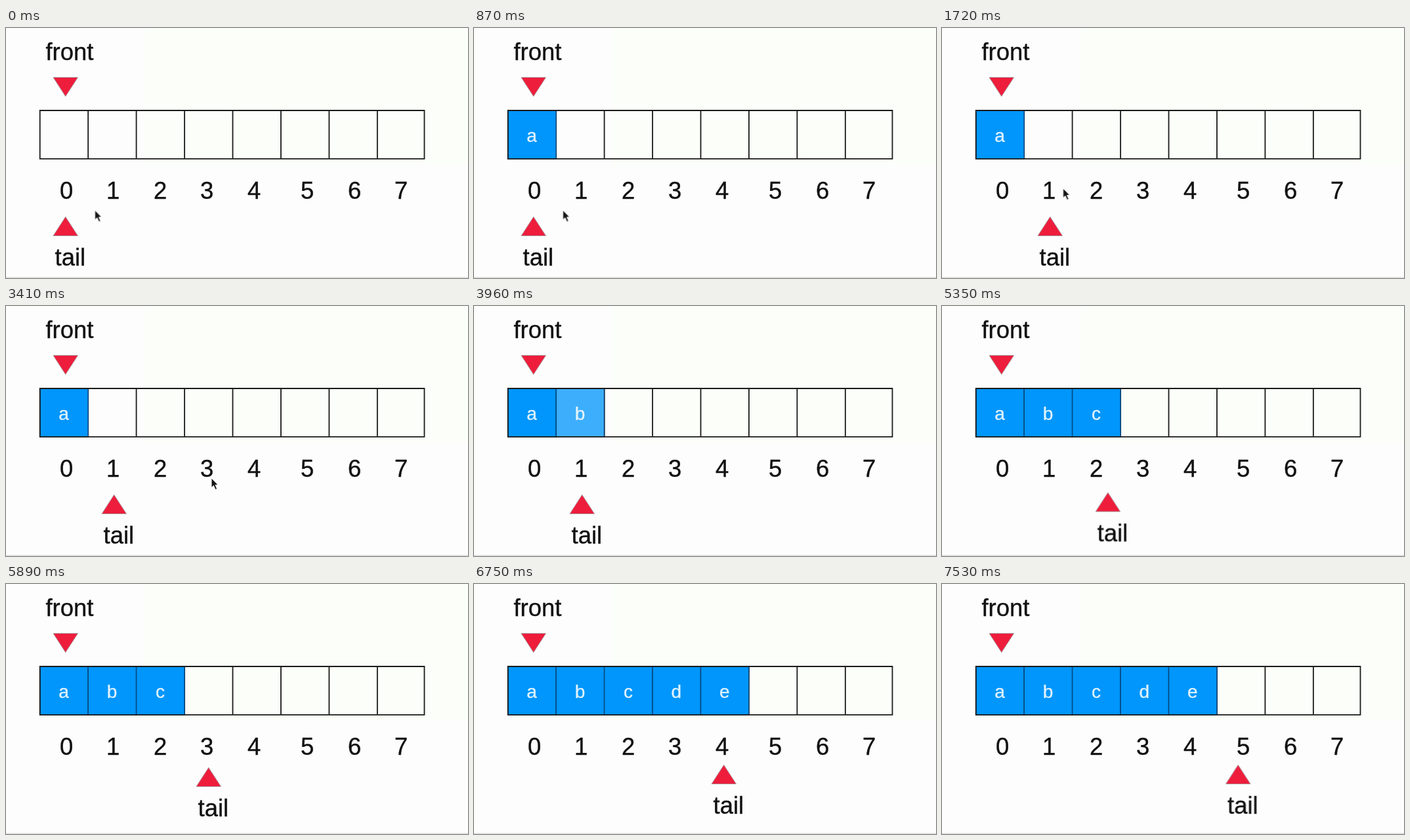
Animation, 704 px wide and 382 px high, one loop 7.76 s. Source, as an HTML page:

```html
<!DOCTYPE html>
<html lang="en">
<head>
<meta charset="utf-8">
<title>Array queue</title>
<style>
  html, body { margin: 0; width: 100%; height: 100%; overflow: hidden; background: #fdfdfd; }
  svg { display: block; width: 704px; height: 382px; }
  text { font: 36.4px "Liberation Sans", Arial, sans-serif; fill: #111; stroke: #111; stroke-width: .4; }
  .mid { text-anchor: middle; }
  .item text { font-size: 28px; fill: #e0f2fe; stroke: #e0f2fe; }
  .item rect { fill: #0096fb; stroke: #07477d; stroke-width: 1.5; }
  .marker { fill: #ee1d3c; stroke: #a9959a; stroke-width: 1; }
  .grid { fill: none; stroke: #1a1a1a; stroke-width: 1.8; }

  .item, #tail, #cursor { animation: 7760ms linear infinite; }
  .item { opacity: 0; }
  .a { animation-name: a; }
  .b { animation-name: b; }
  .c { animation-name: c; }
  .d { animation-name: d; }
  .e { animation-name: e; }
  #tail { animation-name: tail; animation-timing-function: ease-in-out; }
  #cursor { animation-name: cursor; animation-timing-function: ease-in-out; }

  @keyframes a { 0%, 7.73%  { opacity: 0 } 9.28%, 100%  { opacity: 1 } }
  @keyframes b { 0%, 49.87% { opacity: 0 } 51.42%, 100% { opacity: 1 } }
  @keyframes c { 0%, 61.86% { opacity: 0 } 63.4%, 100%  { opacity: 1 } }
  @keyframes d { 0%, 76.8%  { opacity: 0 } 77.84%, 100% { opacity: 1 } }
  @keyframes e { 0%, 84.02% { opacity: 0 } 85.95%, 100% { opacity: 1 } }

  @keyframes tail {
    0%, 16.75%     { transform: translate(0, 0) }
    19.85%, 54.77% { transform: translate(74px, 0) }
    57.86%, 67.91% { transform: translate(144.7px, -2px) }
    71.01%, 79.64% { transform: translate(218px, -8px) }
    82.73%, 89.95% { transform: translate(290px, -12px) }
    93.04%, 100%   { transform: translate(360.5px, -12px) }
  }

  @keyframes cursor {
    0%, 15.08%     { transform: translate(135.5px, 278.5px); opacity: 1 }
    21.9%, 24.2%   { transform: translate(184.5px, 245px) }
    27.7%          { transform: translate(82px, 180px) }
    31.1%, 34%     { transform: translate(170px, 166px) }
    35.05%, 38%    { transform: translate(180px, 166px) }
    40.6%          { transform: translate(82px, 182px) }
    43.8%, 48.06%  { transform: translate(313px, 263px); opacity: 1 }
    48.07%, 100%   { transform: translate(313px, 263px); opacity: 0 }
  }
</style>
</head>
<body>
<svg viewBox="0 0 704 382">
  <rect x="211" width="493" height="208" fill="#fcfef9"/>
  <rect y="380.6" width="704" height="1.4" fill="#dcdcdc"/>

  <text x="60.5" y="48.5">front</text>
  <path class="marker" d="M72 75.5H109.5L90.7 104.5Z"/>

  <g id="items"></g>
  <path class="grid" d="M51.7 126H637.5V199.8H51.7Z"/>
  <g id="digits"></g>

  <g id="tail">
    <path class="marker" d="M72 317.5H109.5L90.7 288.5Z"/>
    <text x="74.6" y="363">tail</text>
  </g>

  <path id="cursor" d="M0 0V14.5L3.4 11.4 6 17.5 8.6 16.4 6 10.5H10.2Z" fill="#151515" stroke="#fff" stroke-width=".9"/>
</svg>
<script>
  const cell = 73.45;
  const left = i => 51.7 + i * cell;
  const byId = id => document.getElementById(id);

  const dividers = [1, 2, 3, 4, 5, 6, 7].map(i => `M${left(i)} 126V200`).join("");
  const items = [..."abcde"].map((ch, i) =>
    `<g class="item ${ch}"><rect x="${left(i)}" y="126" width="${cell}" height="73.8"/>
      <text class="mid" x="${left(i) + cell / 2 - .4}" y="174.3">${ch}</text></g>`);

  byId("items").innerHTML = `<path class="grid" d="${dividers}"/>` + items.join("");
  byId("digits").innerHTML = [92, 163, 235, 306, 378, 459, 531, 602].map((x, i) =>
    `<text class="mid" x="${x}" y="261">${i}</text>`).join("");
</script>
</body>
</html>
```
